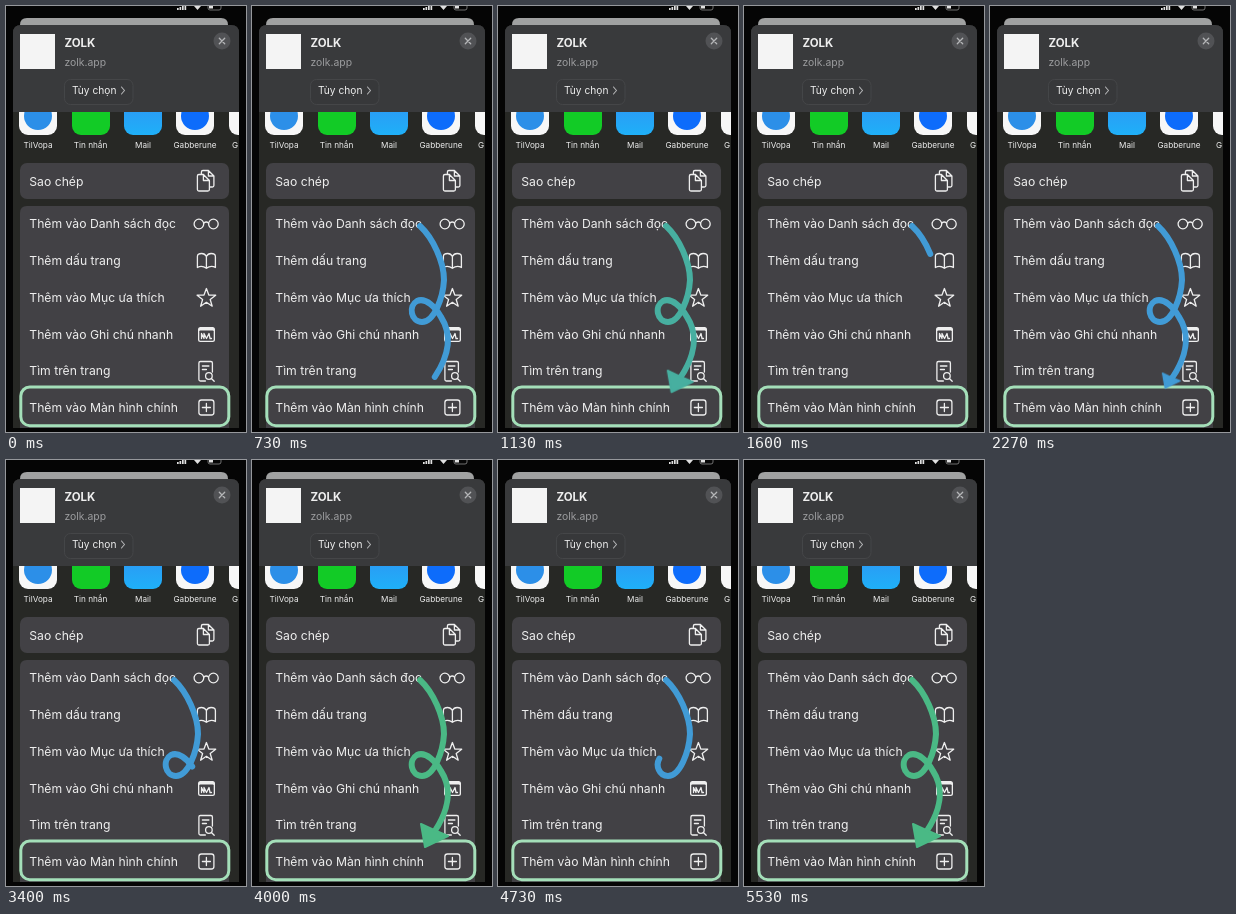
An HTML page for the animation above (5590 ms loop, 240 px wide and 426 px high).

```html
<!DOCTYPE html>
<html lang="vi">
<head>
<meta charset="utf-8">
<title>Thêm vào Màn hình chính</title>
<style>
  html, body { margin: 0; width: 100%; height: 100%; overflow: hidden; background: #050505; }
  svg { display: block; width: 100vw; height: 100vh; }
  text { font-family: Inter, "Open Sans", sans-serif; fill: #eee; }
  .row { font-size: 12.2px; }
  .label { font-size: 8.2px; text-anchor: middle; }
  .icon { fill: none; stroke: #eee; stroke-width: 1.3; stroke-linecap: round; stroke-linejoin: round; }

  /* The arrow repeats four times per loop, in 21 ticks of 1/15 s each. */
  .gate { animation: gate 5590ms step-end infinite; }
  .arrow { animation: tint 1397.5ms -1267.5ms linear infinite; }
  .line {
    fill: none; stroke: currentColor; stroke-width: 6;
    stroke-linecap: round; stroke-linejoin: round; stroke-dasharray: 100 200;
    animation: draw 1397.5ms -1267.5ms linear infinite;
  }
  .head {
    fill: currentColor; stroke: currentColor; stroke-width: 2; stroke-linejoin: round;
    transform-origin: 179px 373px;
    animation: head 1397.5ms -1267.5ms linear infinite;
  }
  @keyframes gate {
    0% { visibility: hidden; }
    2.32% { visibility: visible; }
    26.29% { visibility: hidden; }
    27.32%, 100% { visibility: visible; }
  }
  @keyframes draw {
    0% { stroke-dashoffset: 95; animation-timing-function: steps(1, end); }
    4.76% { stroke-dashoffset: 86; animation-timing-function: steps(5, end); }
    28.57% { stroke-dashoffset: 44; animation-timing-function: steps(1, end); }
    33.33% { stroke-dashoffset: 31; animation-timing-function: steps(2, end); }
    42.86% { stroke-dashoffset: 2; animation-timing-function: steps(1, end); }
    47.62%, 100% { stroke-dashoffset: 0; }
  }
  @keyframes head {
    0% { opacity: 0; transform: scale(.6); animation-timing-function: step-end; }
    47.62% { opacity: 1; transform: scale(.6); animation-timing-function: step-end; }
    52.38% { opacity: 1; transform: scale(.65); animation-timing-function: steps(5, end); }
    76.19%, 100% { opacity: 1; transform: scale(1); }
  }
  @keyframes tint {
    0%, 57.14% { color: #419bd6; }
    61.9% { color: #419bd6; animation-timing-function: steps(3, end); }
    76.19%, 100% { color: #4ab985; }
  }
</style>
</head>
<body>
<svg viewBox="0 0 240 426" preserveAspectRatio="none">
  <defs>
    <clipPath id="sheet"><path d="M7 422V27q0-8 8-8H225q8 0 8 8V422z"/></clipPath>
    <linearGradient id="sky" x2="0" y2="1"><stop stop-color="#2f93f4"/><stop offset="1" stop-color="#1fb0f8"/></linearGradient>
  </defs>

  <!-- status bar -->
  <g fill="#e0e0e0">
    <path d="M171 2h1.700v2h-1.700zM173.500 1h1.700v3h-1.700zM176 0h1.700v4h-1.700zM178.500 0h1.700v4h-1.700z"/>
    <path d="M188 0h7l-3.500 4z"/>
    <path d="M203 0h4v2.500h-4z"/>
    <path d="M202 0v2q0 2 2 2h9q2 0 2-2v-2" fill="none" stroke="#8a8a8a" stroke-width=".8"/>
  </g>

  <path d="M14 24v-5q0-7 7-7H215q7 0 7 7v5z" fill="#a0a1a1"/>
  <g clip-path="url(#sheet)">
    <rect x="7" y="19" width="226" height="403" fill="#272825"/>

    <!-- apps -->
    <rect x="13" y="91" width="38" height="38" rx="9" fill="#f7f7f7"/>
    <circle cx="32" cy="110" r="14" fill="#2c8fe8"/>
    <rect x="66" y="91" width="38" height="38" rx="9" fill="#12cb26"/>
    <rect x="118" y="91" width="38" height="38" rx="9" fill="url(#sky)"/>
    <rect x="170" y="91" width="38" height="38" rx="9" fill="#f7f7f7"/>
    <circle cx="189" cy="110" r="14" fill="#0d6cfb"/>
    <rect x="223" y="91" width="38" height="38" rx="9" fill="#f7f7f7"/>
    <g>
      <text class="label" x="32" y="142">TilVopa</text>
      <text class="label" x="84.500" y="142">Tin nhắn</text>
      <text class="label" x="137" y="142">Mail</text>
      <text class="label" x="189" y="142">Gabberune</text>
      <text class="label" x="229" y="142">G</text>
    </g>

    <!-- header -->
    <rect x="7" y="19" width="226" height="87" fill="#393a3c"/>
    <rect x="14" y="28" width="35" height="35" fill="#f4f4f4"/>
    <text x="58.500" y="41" font-size="11.5" font-weight="700">ZOLK</text>
    <text x="58.500" y="60" font-size="10.4" style="fill:#9b9c9e">zolk.app</text>
    <rect x="58.500" y="73.500" width="68.500" height="25" rx="6" fill="#37383a" stroke="#47484a" stroke-width=".9"/>
    <text x="66" y="88" font-size="10.2">Tùy chọn</text>
    <path class="icon" d="M115.500 81l3 3.500-3 3.500" style="stroke:#b5b6b8;stroke-width:1.1"/>
    <circle cx="216" cy="35" r="8.500" fill="#515255"/>
    <path class="icon" d="M213.300 32.300l5.400 5.400m0-5.400l-5.400 5.400" style="stroke:#b5b6b8"/>

    <!-- menu -->
    <rect x="14" y="157" width="209" height="36" rx="7" fill="#424145"/>
    <path d="M14 422V207q0-7 7-7H216q7 0 7 7V422z" fill="#424145"/>
    <g>
      <text class="row" x="23.300" y="179.500">Sao chép</text>
      <text class="row" x="23.300" y="222">Thêm vào Danh sách đọc</text>
      <text class="row" x="23.300" y="259">Thêm dấu trang</text>
      <text class="row" x="23.300" y="296">Thêm vào Mục ưa thích</text>
      <text class="row" x="23.300" y="332.500">Thêm vào Ghi chú nhanh</text>
      <text class="row" x="23.300" y="369">Tìm trên trang</text>
      <text class="row" x="23.300" y="405.500">Thêm vào Màn hình chính</text>
    </g>
    <g class="icon" transform="translate(-.6 0)">
      <path d="M196 168v-2q0-1.500 1.500-1.500h5.500l5.500 5.500v9.500q0 1.500-1.500 1.500h-2.500M203 164.500v5.500h5.500"/>
      <path d="M193.500 168.500h4.500l6 6v9q0 1.500-1.500 1.500h-9q-1.500 0-1.500-1.500v-13.500q0-1.500 1.500-1.500zM198 168.500v6h6"/>
      <circle cx="193.500" cy="218" r="4.800"/><circle cx="208" cy="218" r="4.800"/>
      <path d="M198.500 217q2.300-2 4.600 0"/>
      <path d="M201 250.500q-1.500-3-4.700-3-4.300 0-4.300 3v11q4.500-2.500 9 .8q4.500-3.300 9-.8v-11q0-3-4.300-3-3.200 0-4.700 3v11.800"/>
      <path d="M201 282.500l2.400 6.500 6.900.2-5.500 4.300 2 6.700-5.800-3.900-5.800 3.900 2-6.700-5.500-4.300 6.900-.2z"/>
      <path d="M200 375h-5q-1.500 0-1.500-1.500v-16.500q0-1.500 1.500-1.500h10.500q1.500 0 1.500 1.500v9M197 360h6.500M197 363.500h4"/>
      <circle cx="203.500" cy="370" r="3.300"/><path d="M206 372.500l2.800 2.800"/>
      <rect x="193.500" y="394" width="15" height="15" rx="2.500"/>
      <path d="M201 397.500v8m-4-4h8"/>
    </g>
    <rect x="192" y="321" width="17" height="15" rx="2.500" fill="#eee"/>
    <rect x="193.300" y="324.500" width="14.400" height="10.200" rx="1" fill="#424145"/>
    <path class="icon" d="M195.500 332.500v-5l2.500 5v-5l2.500 5 2.500-5 1 5h1.500"/>
    <rect x="14.800" y="381" width="208" height="38.700" rx="9" fill="none" stroke="#a4dfb9" stroke-width="3"/>
  </g>

  <g class="gate">
    <g class="arrow">
      <path class="line" pathLength="100" d="M168 220C181 232 192 256 192 274C191 292 182 316 170 316C159 316 156 300 165 295C174 291 184 302 189 311C200 328 198 350 180 375"/>
      <path class="head" d="M169 364L182 370L196 376L173 387z"/>
    </g>
  </g>
</svg>
</body>
</html>
```
